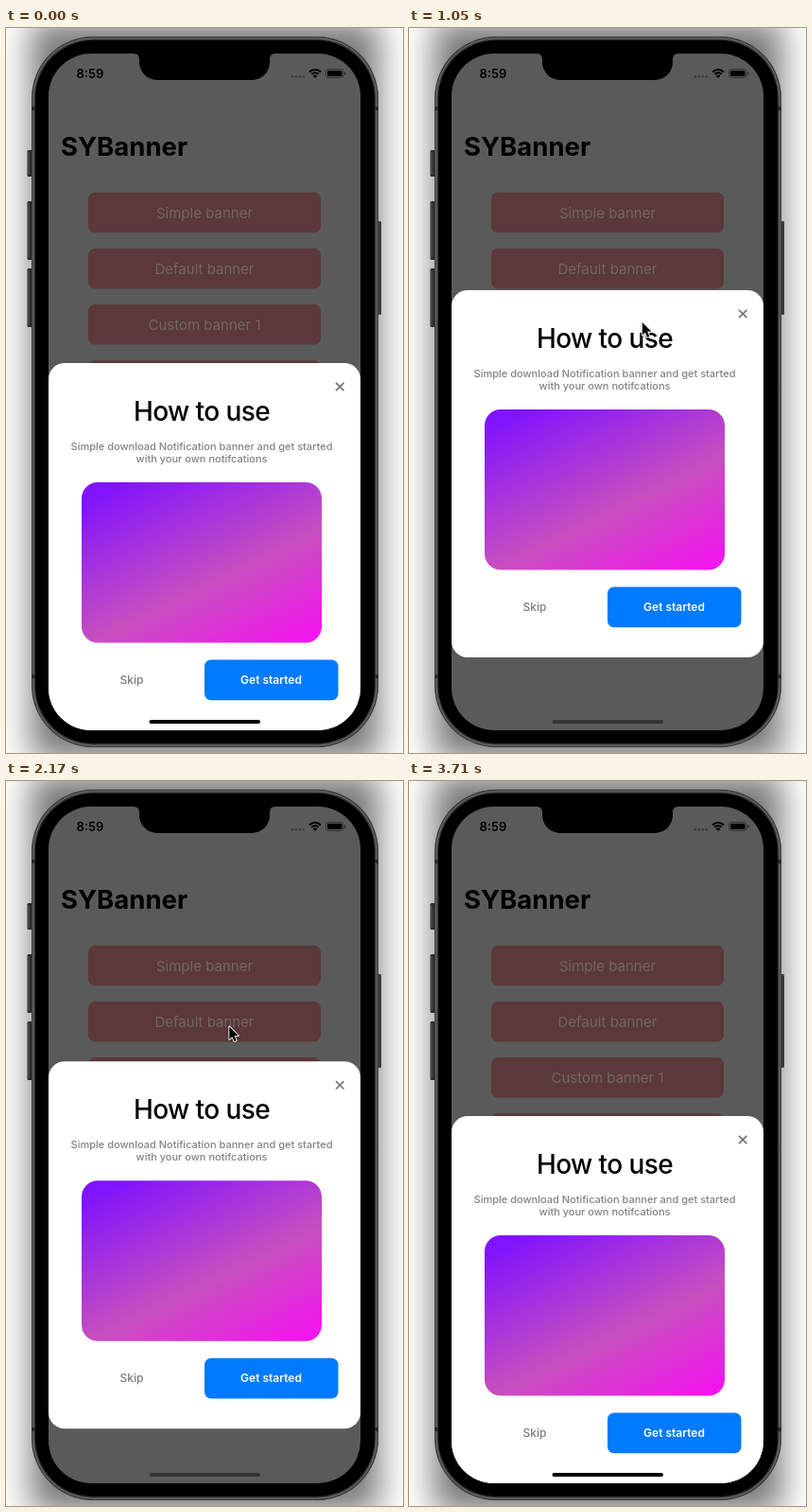
An HTML page with a canvas for the animation above (3990 ms loop, 420x766 px).

```html
<!DOCTYPE html>
<html lang="en">
<head>
<meta charset="utf-8">
<title>Banner demo</title>
<style>
  html, body { margin: 0; width: 100%; height: 100%; overflow: hidden; background: #fff; }
  canvas { display: block; }
</style>
</head>
<body>
<canvas id="stage" width="420" height="766"></canvas>
<script>
const ctx = document.getElementById('stage').getContext('2d');
const LOOP = 3990, STEP = 70;
const REST = 354, SHEET_H = 388;
const SCREEN = { x: 45, y: 27, w: 330, h: 715, r: 45 };

// time, x, y
const CURSOR = [
  [0, 345, 790], [70, 338, 752], [210, 285, 610], [420, 213, 490],
  [560, 222, 446], [630, 241, 441], [840, 246, 441], [1050, 246, 310],
  [1330, 246, 310], [1540, 244, 330], [1820, 236, 404], [1960, 236, 404],
  [2100, 235.5, 258.5], [2450, 235.5, 258.5], [2590, 236, 268],
  [3080, 245, 520], [3640, 262, 775]
];
// each drag: time, offset; the last point is the release
const DRAGS = [
  [[840, 0], [910, -22], [1050, -77], [1330, -82]],
  [[1960, 0], [2030, -45], [2100, -82]]
];

function track(keys, t) {
  const i = keys.findIndex(k => k[0] > t);
  if (i < 0) return keys[keys.length - 1].slice(1);
  if (i === 0) return keys[0].slice(1);
  const a = keys[i - 1], b = keys[i], p = (t - a[0]) / (b[0] - a[0]);
  return a.slice(1).map((v, j) => v + (b[j + 1] - v) * p);
}

function spring(s) {
  const w = 9, k = 11.2;
  return Math.exp(-k * s) * (Math.cos(w * s) + k / w * Math.sin(w * s));
}

function sheetOffset(t) {
  let y = 0;
  for (const drag of DRAGS) {
    const [end, peak] = drag[drag.length - 1];
    if (t < drag[0][0]) break;
    y = t <= end ? track(drag, t)[0] : peak * spring((t - end) / 1000);
  }
  return Math.abs(y) < 0.3 ? 0 : y;
}

function boxPath(x, y, w, h, r) {
  ctx.beginPath();
  ctx.roundRect(x, y, w, h, r);
}

function box(x, y, w, h, r, fill) {
  boxPath(x, y, w, h, r);
  ctx.fillStyle = fill;
  ctx.fill();
}

function label(str, x, y, size, weight, fill, align = 'center', spacing = 0) {
  ctx.font = `${weight} ${size}px Inter, "Liberation Sans", sans-serif`;
  ctx.letterSpacing = spacing + 'px';
  ctx.textAlign = align;
  ctx.fillStyle = fill;
  ctx.fillText(str, x, y);
}

// shadow of a square-cornered block kept outside the stage
function drawGlow() {
  ctx.save();
  ctx.shadowColor = 'rgba(0,0,0,.55)';
  ctx.shadowBlur = 34;
  ctx.shadowOffsetX = 1000;
  box(-973, -6, 367, 778, 0, '#000');
  ctx.restore();
}

function drawPhone() {
  ctx.fillStyle = '#fff';
  ctx.fillRect(0, 0, 420, 766);
  drawGlow();

  for (const [y, h] of [[129, 28], [183, 62], [254, 62]]) {
    box(22.5, y, 5.5, h, 1.5, '#2c2c2e');
    box(23.5, y + 2, 1, h - 4, 0, '#5a5a5c');
  }
  box(393, 204, 4, 99, 1.5, '#3a3a3c');

  box(27, 9, 367, 751, 65, '#3b3b3d');
  boxPath(28.8, 10.8, 363.4, 747.4, 63.5);
  ctx.strokeStyle = '#747476';
  ctx.lineWidth = 1;
  ctx.stroke();
  box(31, 13, 359, 743, 61, '#000');
  for (const y of [83, 683]) {
    box(27, y, 4, 4, 0, '#29292b');
    box(390, y, 4, 4, 0, '#29292b');
  }
}

function drawNotch() {
  ctx.beginPath();
  ctx.moveTo(135, 26);
  ctx.lineTo(135, 27);
  ctx.quadraticCurveTo(141, 27, 141, 33);
  ctx.arcTo(141, 55, 161, 55, 19);
  ctx.arcTo(279, 55, 279, 35, 19);
  ctx.lineTo(279, 33);
  ctx.quadraticCurveTo(279, 27, 285, 27);
  ctx.lineTo(285, 26);
  ctx.fillStyle = '#000';
  ctx.fill();
}

function drawStatus() {
  label('8:59', 74.5, 52.5, 13, 600, '#000', 'left');
  for (let i = 0; i < 4; i++) box(301.5 + i * 4, 50, 2.6, 2.6, 1.3, '#3c3c3c');

  ctx.strokeStyle = '#000';
  ctx.lineWidth = 2;
  for (const r of [5.2, 8.4]) {
    ctx.beginPath();
    ctx.arc(327, 52.5, r, -Math.PI * 0.75, -Math.PI * 0.25);
    ctx.stroke();
  }
  ctx.beginPath();
  ctx.moveTo(327, 53);
  ctx.arc(327, 53, 3.4, -Math.PI * 0.75, -Math.PI * 0.25);
  ctx.fillStyle = '#000';
  ctx.fill();

  boxPath(338.5, 43.5, 18.5, 9, 2.8);
  ctx.strokeStyle = '#303030';
  ctx.lineWidth = 1;
  ctx.stroke();
  box(340, 45, 15.5, 6, 1.5, '#000');
  box(358, 46.3, 1.4, 3.4, 0.7, '#303030');
}

function drawPage() {
  box(45, 27, 330, 715, 0, '#5a5a5a');
  drawNotch();
  drawStatus();
  label('SYBanner', 58, 134.5, 27.5, 700, '#000', 'left');
  ['Simple banner', 'Default banner', 'Custom banner 1', ''].forEach((name, i) => {
    const y = 173.7 + i * 59.2;
    box(87, y, 246, 42.5, 7, '#5b3839');
    label(name, 210, y + 27, 15, 400, '#726465');
  });
}

function drawSheet(top) {
  box(45, top, 330, SHEET_H, 17, '#fff');
  ctx.save();
  ctx.translate(0, top);

  ctx.beginPath();
  ctx.moveTo(349, 20.8);
  ctx.lineTo(357.4, 29.2);
  ctx.moveTo(357.4, 20.8);
  ctx.lineTo(349, 29.2);
  ctx.strokeStyle = '#757575';
  ctx.lineWidth = 1.7;
  ctx.stroke();

  label('How to use', 207, 60.5, 28, 500, '#000', 'center', -0.6);
  label('Simple download Notification banner and get started', 207, 92, 11, 500, '#828282');
  label('with your own notifcations', 207, 105, 11, 500, '#828282');

  const grad = ctx.createLinearGradient(80, 126, 196, 363);
  grad.addColorStop(0, '#7f12ff');
  grad.addColorStop(0.08, '#8215fb');
  grad.addColorStop(0.59, '#c84fbf');
  grad.addColorStop(0.95, '#f216ec');
  grad.addColorStop(1, '#f512f0');
  box(80, 126, 254, 169.5, 17, grad);

  label('Skip', 133, 339, 12, 500, '#7a7a7a');
  box(210, 313.5, 141.5, 42.7, 7, '#007aff');
  label('Get started', 280.5, 339, 12, 600, '#fff');
  ctx.restore();
}

function drawCursor(x, y) {
  ctx.save();
  ctx.translate(x + 0.8, y + 1);
  ctx.scale(0.9, 0.9);
  ctx.beginPath();
  [[0, 0], [0, 15], [3.4, 11.9], [5.8, 17.4], [8.3, 16.3], [5.9, 10.9], [10.6, 10.6]]
    .forEach(p => ctx.lineTo(...p));
  ctx.closePath();
  ctx.lineJoin = 'round';
  ctx.lineWidth = 2;
  ctx.strokeStyle = '#fff';
  ctx.shadowColor = 'rgba(0,0,0,.35)';
  ctx.shadowBlur = 3;
  ctx.shadowOffsetY = 1;
  ctx.stroke();
  ctx.shadowColor = 'transparent';
  ctx.fillStyle = '#000';
  ctx.fill();
  ctx.restore();
}

function draw(t) {
  const top = REST + sheetOffset(t);
  drawPhone();
  ctx.save();
  boxPath(SCREEN.x, SCREEN.y, SCREEN.w, SCREEN.h, SCREEN.r);
  ctx.clip();
  drawPage();
  // square off the resting sheet so the screen mask shapes its corners
  if (top >= REST) box(45, 700, 330, 42, 0, '#fff');
  drawSheet(top);
  box(151.5, 731, 117.5, 4, 2, top + SHEET_H > 733 ? '#000' : '#353535');
  ctx.restore();
  if (t > 0 && t < 3710) drawCursor(...track(CURSOR, t));
}

let start;
function tick(now) {
  start ??= now;
  const t = (now - start) % LOOP;
  draw(Math.floor(t / STEP) * STEP);
  requestAnimationFrame(tick);
}
draw(0);
requestAnimationFrame(tick);
</script>
</body>
</html>
```
